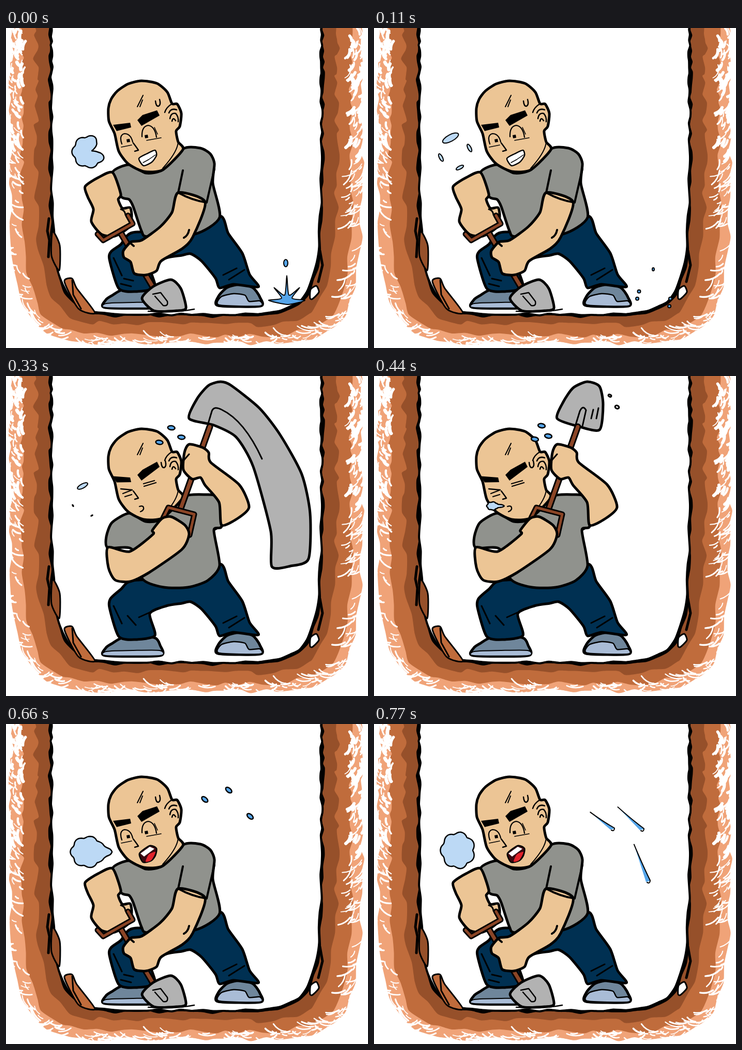
Write an HTML page that moves like this. It is 700 px wide and 618 px high and loops after 880 ms.

```html
<!DOCTYPE html>
<html lang="en">
<head>
<meta charset="utf-8">
<title>Digging</title>
<style>
html, body { margin: 0; width: 100%; height: 100%; overflow: hidden; background: #fff; }
svg { display: block; width: 100%; height: 100%; }
path, ellipse { stroke-linecap: round; stroke-linejoin: round; }
</style>
</head>
<body>
<svg id="stage" viewBox="0 0 700 618"></svg>
<script>
const SKIN = '#ecc595', SHIRT = '#90928d', PANTS = '#003052', SHOE = '#6f869b', SOLE = '#a9bcd6';
const STEEL = '#b2b2b2', WOOD = '#8b4526', PUFF = '#bcd9f5', SWEAT = '#55a5ea', INK = '#000';
const SALMON = '#f0a378', CLAY = '#c06c3c', EARTH = '#96502a';
const { PI, sin, cos, abs, pow, exp } = Math;

let seed = 17;
const rnd = (a, b) => a + (b - a) * (seed = seed * 16807 % 2147483647) / 2147483647;
const range = n => [...Array(n).keys()];
const each = (n, f) => range(n).map(f).join('');

const path = (d, fill, w, ink = INK) =>
  `<path d="${d}" fill="${fill}" stroke="${ink}" stroke-width="${w}"/>`;
const line = (d, w = 3, ink = INK) => path(d, 'none', w, ink);
const solid = (d, fill = INK) => path(d, fill, 0);
const oval = (x, y, rx, ry, turn = 0, fill = SWEAT, w = 2) =>
  `<ellipse rx="${rx}" ry="${ry}" transform="translate(${x} ${y}) rotate(${turn})" fill="${fill}" stroke="${INK}" stroke-width="${w}"/>`;
const wood = (d, w = 12) => line(d, w) + line(d, w - 6, WOOD);

// Closed soft curve through a few key points.
function shape(points, fill, w = 5, soft = .12) {
  const at = typeof points === 'string' ? points.split(' ').map(s => s.split(',').map(Number)) : points;
  const n = at.length, pt = i => at[(i + n) % n];
  const handle = (i, k) => [0, 1].map(j => (pt(i)[j] + k * (pt(i + 1)[j] - pt(i - 1)[j])).toFixed(1));
  return path(`M${at[0]}` + each(n, i => `C${handle(i, soft)} ${handle(i + 1, -soft)} ${pt(i + 1)}`) + 'Z', fill, w);
}

// The pit is a set of nested superellipses with rough edges.
function rim(a, halfWidth, depth) {
  const r = pow(pow(abs(cos(a) / halfWidth), 7) + pow(abs(sin(a) / depth), 7), -1 / 7);
  return [349 + r * cos(a), r * sin(a)];
}
const layer = (halfWidth, depth, rough, fill, w = 0) => shape(
  range(90).map(i => rim(PI * (1.03 - 1.06 * i / 89), halfWidth, depth).map(v => v + rnd(-rough, rough))), fill, w);

function scratch() {
  const a = rnd(0, PI), turn = a + PI / 2 + rnd(-.6, .6);
  const inset = rnd(-5, 30), len = rnd(6, sin(a) > .6 ? 32 : 18);
  const [x, y] = rim(a, 345 - inset, 613 - inset * .6);
  const flat = sin(a) > .9 ? PI / 2 - a : 0;
  const dx = len * cos(turn + flat), dy = len * sin(turn + flat);
  return line(`M${x},${y}q${dx / 2 + dy / 5},${dy / 2 - dx / 5} ${dx},${dy}`, rnd(1.5, sin(a) > .6 ? 3.5 : 7), '#fff');
}

const pit =
  layer(340, 609, 4, SALMON) + layer(318, 594, 5, CLAY) + layer(291, 573, 6, EARTH) +
  each(420, scratch) +
  layer(265, 557, 3, INK) + layer(261, 553, 2, '#fff', 4) +
  line('M83,368 L80,392 84,410 82,442 M607,430 L612,458 604,490', 5) +
  shape('90,393 104,420 103,468 88,440', EARTH, 3) +
  shape('113,490 128,484 137,503 172,550 140,542', CLAY, 3) + line('M128,487 L130,515 145,542') +
  shape('588,522 589,505 600,498 605,510 593,523', '#fff', 3);

const shoes =
  shape('192,540 193,525 206,516 228,505 286,505 298,520 298,540', SHOE) +
  shape('193,540 194,532 245,530 297,530 298,540', SOLE, 2) +
  shape('410,536 411,518 428,501 455,495 478,502 491,520 492,537', SHOE) +
  shape('412,535 416,519 440,513 462,516 470,528 491,527 491,537', SOLE, 2.5);
const legs = knee => shoes +
  shape(`245,395 ${knee} 200,447 218,503 250,509 288,501 278,459 310,444 340,439 357,436 378,450 405,483 413,502 440,495 488,500 471,476 457,435 430,397 414,363 345,390`, PANTS) +
  line('M208,444 L224,478 M420,477 L446,464 M431,486 L461,467');
const stance = legs('222,412 202,430') + line('M235,463 L251,481 M257,466 L277,457');
const crouch = legs('222,418 203,432') + line('M222,494 L242,499 M228,484 L246,488');

const head =
  shape('218,238 210,204 199,180 198,155 203,138 215,122 236,108 262,102 292,107 312,124 321,146 331,147 339,165 336,190 329,199 333,220 342,235 303,274 266,277 236,262', SKIN) +
  line('M329,200 L333,218 Q333,238 303,271 M265,130 L254,152 M264,139 L259,152', 2) +
  line('M307,163 Q310,153 320,147 M315,164 Q319,154 330,158 M317,175 Q319,163 328,165 Q334,171 333,181 M321,180 Q323,171 328,179', 2.5) +
  line('M246,222 Q255,234 256,236 L249,238', 2.5);
// Brows sink by drop; the inner end of the right brow thickens with it.
const brows = drop =>
  solid(`M207,${187 + drop / 2} L240,${183 + drop} 242,${192 + drop} 214,${199 + drop / 2}Z`) +
  solid(`M254,${178 + drop} L264,${168 + drop} 292,${159 + drop / 2} 297,${169 + drop / 2} 262,${189 + drop}Z`);
const pupils = each(2, i => solid(`M${233 + 35 * i},${215 - 8 * i} l6,-1 1,6 -6,1Z`)) +
  line('M223,230 L243,226 M272,217 L300,212 M287,192 L293,205', 1.6);
const curl = (x, y) => line(`M${x},${y} q1,11 6,10 q5,-3 2,-13`, 2.5);
const grit = shape('257,252 272,243 288,236 291,246 282,259 266,266', '#fff', 2.5) +
  line('M265,260 L276,254 289,245', 1.5);
const shout = shape('258,250 278,235 291,240 289,254 281,264 265,267', '#3b0710', 2.5) +
  shape('270,266 276,252 289,247 281,263', '#e2232b', 0) + solid('M260,250 L278,237 287,241 267,256Z', '#fff');

const strainFace = mouth => head + brows(0) + pupils + mouth + curl(289, 141) +
  line('M224,224 Q218,207 229,204 Q241,204 245,220 M263,210 Q262,190 275,188 Q288,190 291,211', 2.2);
const angryFace = head + brows(9) + pupils + grit + curl(295, 152) +
  line('M224,226 L219,213 241,208 246,222 M264,214 L262,203 284,194 288,208', 2.3);
const shutFace = head + brows(13) + curl(300, 167) +
  line('M222,218 L244,220 226,227 M230,233 L243,229 M266,208 L287,202 M267,213 L290,206 M258,252 Q267,249 266,257 Q264,261 260,262', 2.3);

const dig = mouth => crouch +
  shape('206,279 238,264 270,280 303,274 343,233 376,232 395,243 403,262 400,300 413,366 365,398 275,403 262,392 246,345 238,331 222,325', SHIRT) +
  shape('206,279 178,289 153,306 158,326 169,350 165,374 184,398 210,402 236,386 243,365 240,347 225,348 217,331 222,321', SKIN) +
  line('M222,350 Q230,352 231,361 L241,362') +
  wood('M222,396 L290,510', 13) + wood('M177,398 L188,410 245,378 236,362', 11) +
  shape('333,318 321,356 298,384 262,410 242,413 227,430 228,443 241,452 248,474 270,477 291,469 300,450 341,426 361,404 385,336', SKIN) +
  line('M342,275 L333,318 Q360,333 388,337 L403,272 M354,390 Q352,401 344,405 M239,414 L247,421', 4) +
  shape('263,522 285,499 319,486 338,503 348,541 330,546 286,546', STEEL) +
  line('M284,514 L299,511 312,528 Q314,538 304,536 L288,518 M275,547 Q330,550 364,543', 2.5) +
  strainFace(mouth);

const hip = socket => stance +
  shape('422,250 459,268 465,295 467,340 418,350 405,304', SKIN) +
  shape('236,266 206,284 195,304 194,326 248,341 264,392 305,408 352,408 390,395 412,370 406,304 414,311 422,249 400,235 378,230 345,233 303,273 270,281', SHIRT) +
  line('M245,318 L249,342 M412,280 L405,305', 4) +
  shape('194,326 180,360 181,374 199,384 270,395 306,400 316,376 317,346 297,334 273,343 267,353 225,341', SKIN) +
  wood('M347,353 L412,350') +
  path('M296,324 L345,320 347,393 308,400 307,394 330,390 330,329 297,335Z', WOOD, 3) +
  shape('492,309 538,310 568,323 586,350 570,376 538,389 494,392', STEEL) +
  shape('470,345 520,343 532,350 520,356 470,356', socket, 3) + wood('M471,350 L496,350', 13) +
  shape('410,352 444,342 464,332 471,343 474,375 467,385 425,387 411,378', SKIN) +
  line('M412,353 L467,347') + each(4, i => line(`M${421 + 14 * i},${352 - i} l3,7`)) +
  angryFace;

const up = blade => stance +
  shape('238,265 205,283 194,310 197,332 243,334 264,392 305,408 352,408 390,395 413,366 402,298 417,290 411,235 385,229 343,233 303,276 270,281', SHIRT) +
  shutFace + blade + wood('M394,98 L337,258', 13) +
  shape('345,148 354,132 380,138 392,148 396,167 451,210 470,253 448,275 417,288 412,244 385,211 376,196 360,199 343,181', SKIN) +
  wood('M304,274 L314,254 364,267 355,307', 11) +
  shape('197,331 198,370 211,394 240,397 276,380 340,335 354,306 346,288 320,272 302,275 283,298 284,306 239,339', SKIN) +
  line('M341,166 L354,151 M402,298 L414,292');
const blade = shape('354,82 366,50 385,23 412,11 436,20 443,55 436,104 394,97', STEEL) +
  line('M390,94 L398,68 Q404,55 410,66 L403,97 M424,65 L420,82 M434,62 L430,82');
const sweep = shape('354,82 370,43 392,18 415,11 435,18 490,62 531,115 572,190 588,265 585,353 550,367 514,368 512,300 478,175 445,118 402,95', STEEL) +
  line('M390,95 L398,68 Q402,57 417,65 Q461,86 495,160');

// Bumpy puff of breath; reach stretches (or bites) it in one direction.
const cloud = (x, y, rx, ry, reach = 0, aim = 0, spread = .22) => shape(range(48).map(i => {
  const a = PI * (i / 24 - 1);
  const k = .88 + .14 * abs(sin(a * 3.5)), pull = reach * exp(-pow((a - aim) / spread, 2));
  return [x + (rx * k + pull) * cos(a), y + (ry * k + pull) * sin(a)];
}), PUFF, 2.5);
const wisps = age => each(age > 2 ? 3 : 4, i => {
  const a = PI * (.4 + i / 2), size = (i === 2 ? 20 : 11) - 3 * age;
  return oval(157 + 29 * cos(a), 241 + 30 * sin(a), size, size * .38, a * 180 / PI + 80, PUFF);
});

// Sweat beads pass through three key places, at ages 0, 1 and 3 steps.
const arc = (a, b, c, t) => a + t * (b - a) + t * (t - 1) * (c - 3 * b + 2 * a) / 6;
const beads = [
  [[324, 96], [366, 92], [518, 203]],
  [[337, 116], [343, 117], [461, 202]],
  [[311, 122], [399, 118], [530, 303]]
];
const bead = ([a, b, c], t) => [0, 1].map(j => arc(a[j], b[j], c[j], t));
const sweat = t => beads.map(b => oval(...bead(b, t), 7, 4, 10 + 15 * t, SWEAT, 2.5)).join('');
const streaks = beads.map(b => {
  const [x, y] = bead(b, 3), tail = `M${bead(b, 2.5)} Q${bead(b, 2.8)}`;
  return solid(`${tail} ${x + 4},${y} L${x - 4},${y + 2}Z`, SWEAT) +
    line(`${tail} ${x + 4},${y - 1} q0,7 -6,4`, 2);
}).join('');

const splash = shape(range(9).map(i => {
  const a = PI * (1 + i / 8), r = i % 2 ? 11 : i === 4 ? 48 : 35;
  return [543 + r * cos(a), 526 + r * sin(a)];
}).concat([[545, 534]]), SWEAT, 2) + oval(541, 454, 4, 7);
const spray = age => each(4, i => {
  const a = PI * (i < 2 ? 1.02 + .13 * i : 1.72 + .13 * i);
  return oval(541 + (26 + 6 * age) * cos(a), 525 + 36 * sin(a), 4 - age, 4 - age);
}) + oval(540, 455 + 11 * age, 2, 4 - age);

const dirt = each(3, i => oval(489 + 32 * i, 439 - 15 * i, 11 - 2 * i, 8 - i, -40, WOOD, 3));
const grains = each(2, i => oval(456 + 14 * i, 38 + 22 * i, 3 + i, 2 + i, 25, '#fff', 3));

const scenes = [
  dig(grit) + cloud(160, 239, 32, 31, -26, -.35, .4) + splash,
  dig(grit) + wisps(1) + spray(1),
  hip(WOOD) + wisps(2) + spray(2) + dirt,
  up(sweep) + wisps(3) + sweat(-.15),
  up(blade) + cloud(229, 251, 11, 8, 13) + sweat(0) + grains,
  hip(STEEL) + cloud(185, 250, 29, 25, 24) + sweat(1),
  dig(shout) + cloud(158, 247, 33, 30, 18) + sweat(2),
  dig(shout) + cloud(162, 244, 33, 35) + streaks
];

const stage = document.getElementById('stage');
stage.innerHTML = pit + scenes.map(s => `<g display="none">${s}</g>`).join('');
const poses = [...stage.children].slice(-scenes.length);
const STEP = 110, start = performance.now();

function draw() {
  const now = Math.floor((performance.now() - start) / STEP) % poses.length;
  poses.forEach((g, i) => g.setAttribute('display', i === now ? 'inline' : 'none'));
  requestAnimationFrame(draw);
}
draw();
</script>
</body>
</html>
```
